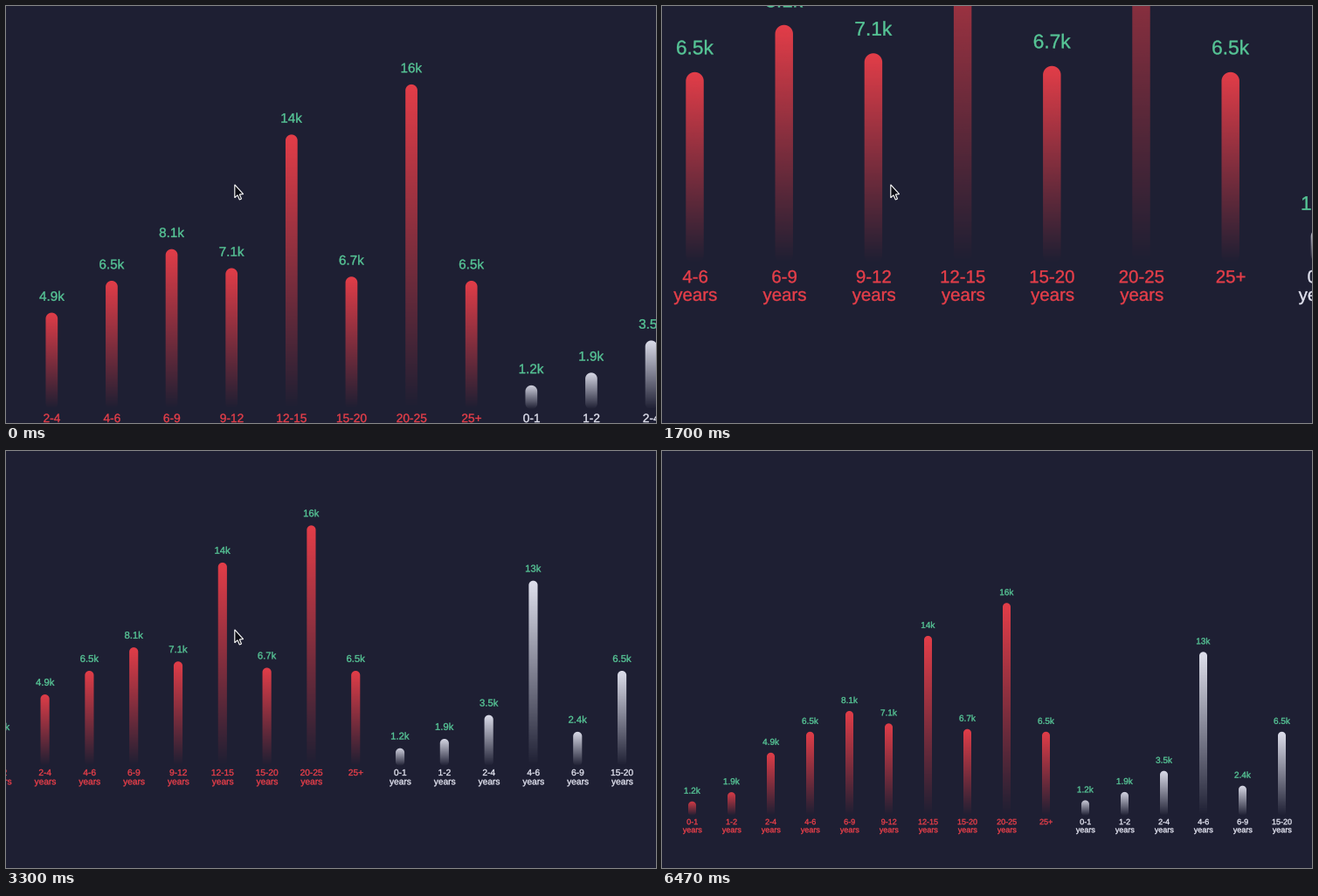
A matplotlib script for the animation above (6510 ms loop, 744 by 478 pixels).

```python
import matplotlib.pyplot as plt
import numpy as np
from matplotlib.animation import FuncAnimation
from matplotlib.colors import to_rgb
from matplotlib.patches import PathPatch, Polygon
from matplotlib.path import Path
from matplotlib.textpath import TextPath
from matplotlib.transforms import Affine2D

W, H = 744, 478
STEP, FRAMES = 30, 217
BG, RED, WHITE, GREEN = "#1e1f33", "#e63e49", "#e2e3f0", "#56c596"
BASE, RADIUS, GAP, LEFT = 418.5, 4.5, 45, 34.5
ZOOM = 2.271
CURSOR = (262, 207)
REST = -44

# age range, value label, bar top
RED_BARS = [
    ("0-1", "1.2k", 401.7), ("1-2", "1.9k", 391.1), ("2-4", "4.9k", 345.8),
    ("4-6", "6.5k", 321.8), ("6-9", "8.1k", 298), ("9-12", "7.1k", 312.3),
    ("12-15", "14k", 211.9), ("15-20", "6.7k", 318.7),
    ("20-25", "16k", 174.2), ("25+", "6.5k", 321.8),
]
WHITE_BARS = [
    ("0-1", "1.2k", 400.4), ("1-2", "1.9k", 390.9), ("2-4", "3.5k", 366.7),
    ("4-6", "13k", 230.3), ("6-9", "2.4k", 383.7), ("15-20", "6.5k", 321.8),
]

plt.rcParams["font.family"] = "Liberation Sans"
fig = plt.figure(figsize=(W / 100, H / 100), dpi=100, facecolor=BG)
ax = fig.add_axes([0, 0, 1, 1])
cam = Affine2D()
view = cam + ax.transData


def label(text, x, y, size, color):
    path = TextPath((0, 0), text, size=size)
    box = path.get_extents()
    mid = (box.x0 + box.x1) / 2 - 0.02 * size
    path = path.transformed(Affine2D().translate(-mid, 0).scale(1, -1).translate(x, y))
    ax.add_patch(PathPatch(path, fc=color, ec=color, lw=0.25, transform=view))


def capsule(x, top, bottom):
    a = np.linspace(0, np.pi, 30)
    dx, dy = RADIUS * np.cos(a), RADIUS * np.sin(a)
    cap = np.column_stack([x + dx, top + RADIUS - dy])
    foot = np.column_stack([x - dx, bottom - RADIUS + dy])
    return Path(np.vstack([cap, foot, cap[:1]]), closed=True)


def bar(x, top, color):
    fade = np.ones((256, 1, 4))
    fade[..., :3] = to_rgb(color)
    fade[:, 0, 3] = np.linspace(1, 0, 256)
    side = RADIUS + 2
    im = ax.imshow(fade, extent=(x - side, x + side, BASE, top - 1),
                   aspect="auto", interpolation="bilinear", transform=view)
    im.set_clip_path(capsule(x, top, BASE), view)


def column(i, age, value, top, color):
    x = LEFT + GAP * i
    bar(x, top, color)
    label(value, x, top - 9, 10, GREEN)
    label(age, x, 428.1, 9, color)
    if not age.endswith("+"):
        label("years", x, 437.2, 9, color)


for i, row in enumerate(RED_BARS):
    column(i, *row, RED)
for i, row in enumerate(WHITE_BARS, len(RED_BARS)):
    column(i, *row, WHITE)

arrow = Polygon([(261.8, 204.8), (261.8, 219.8), (265, 216.8), (267.3, 222),
                 (269.5, 221), (267.3, 216), (271.6, 215.6)],
                fc="#0c0c14", ec="white", lw=0.8, zorder=5)
ax.add_patch(arrow)
ax.set(xlim=(0, W), ylim=(H, 0))
ax.axis("off")


def smooth(t, start, end):
    u = np.clip((t - start) / (end - start), 0, 1)
    return u * u * (3 - 2 * u)


def camera(t):
    cx, cy = CURSOR
    if t < 2680:
        # pinch in at the cursor, then scroll down and sideways
        u = min(t / 580, 1)
        s = 1.525 + (ZOOM - 1.525) * (1 - (1 - u) ** 2)
        tx = cx * (1 - s) - 560 * smooth(t, 1580, 2625)
        ty = REST * s + cy * (1 - s) - 292 * smooth(t, 690, 1340)
        return s, tx, ty
    # pinch out, held inside the right and bottom edges
    s = ZOOM + (1 - ZOOM) * smooth(t, 2690, 3450)
    tx = max(cx - 508.6 * s, W * (1 - s))
    ty = max(cy - 379.7 * s, H - (H - REST) * s)
    return s, tx, ty - REST * smooth(t, 5450, 5900)


def draw(i):
    t = i * STEP
    s, tx, ty = camera(t)
    cam.clear().scale(s).translate(tx, ty)
    arrow.set_visible(t < 6200)


anim = FuncAnimation(fig, draw, frames=FRAMES, interval=STEP,
                     repeat=True, repeat_delay=0)
plt.show()
```
